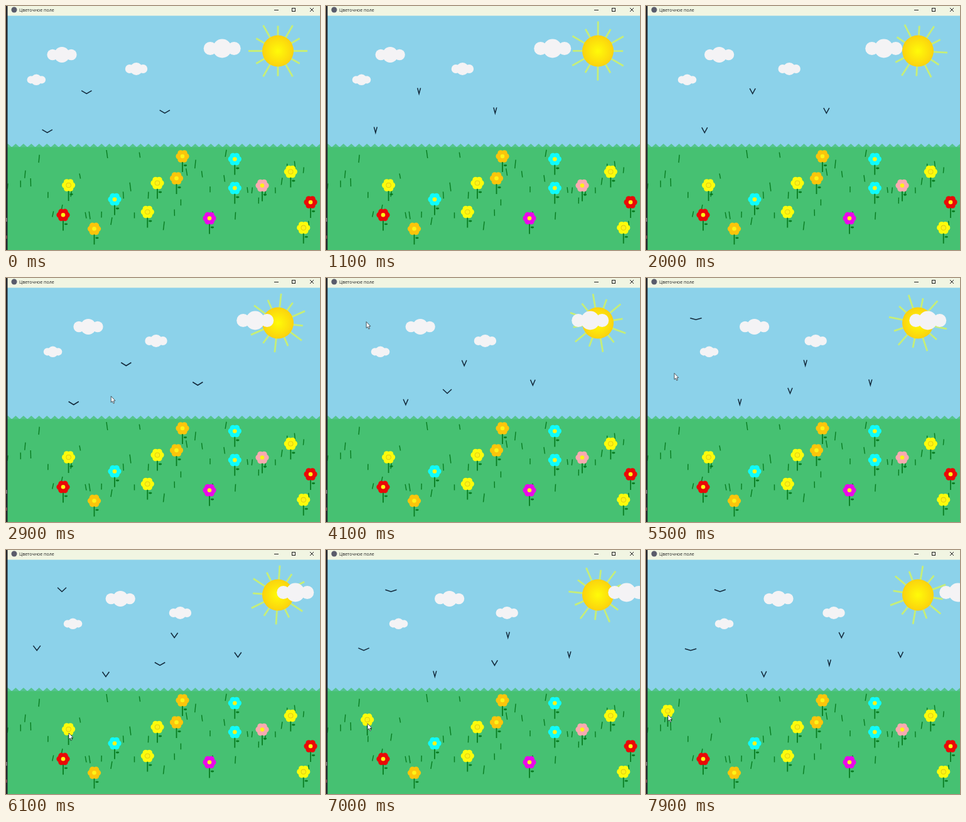
An HTML page with a canvas for the animation above (8 s loop, 500 px wide and 388 px high).

```html
<!DOCTYPE html>
<html lang="ru">
<head>
<meta charset="utf-8">
<title>Цветочное поле</title>
<style>
html, body { margin: 0; width: 100%; height: 100%; overflow: hidden; background: #8cd2ea; }
canvas { display: block; width: 500px; height: 388px; }
</style>
</head>
<body>
<canvas id="stage" width="500" height="388"></canvas>
<script>
const c = document.getElementById('stage').getContext('2d');
const LOOP = 8000, W = 500, H = 388, TAU = Math.PI * 2;
const SKY = '#8cd2ea', GRASS = '#46c172', STEM = '#087c20', CLOUD = '#f4f3f5';
const YELLOW = '#fdfb0c';

// x, y, size; drift speed follows size
const clouds = [[344.2, 67.5, 1], [89, 77.5, .8], [207.5, 100, .6], [48.3, 117.3, .5]];

// three birds fly from the beginning, each click adds one more
const birds = [128.3, 252.8, 65.7].map((x, i) =>
  ({ start: 0, x, y: 139.5 + 31 * i, speed: .024 - .004 * i, phase: 3.63 }));
const hatch = (start, x, y, speed) => birds.push({ start, x, y, speed, phase: 0 });
hatch(3360, 173.8, 183.5, .026);
hatch(4634, 65.6, 66.2, .016);
hatch(5590, 42.9, 159.7, .0122);

const beds = {
  '#fbc50c': [[281, 239], [271.5, 274], [140.5, 354.3]],
  '#0ffcfc': [[364.3, 243.5], [364.3, 289.5], [173, 307.5]],
  [YELLOW]: [[453.3, 263.5], [241, 281.5], [225.3, 327.5], [473.7, 352.7]],
  '#ea0808': [[91, 332.3], [485, 312]],
  '#fbaab0': [[408, 285.5]],
  '#ea08ea': [[324, 337.5]]
};

// pointer: time, x, y
const path = [
  [2450, -10, 230], [2880, 167, 188], [3500, 174, 184], [4000, 64, 70], [4634, 65, 67],
  [5590, 43, 160], [6050, 100, 291], [6350, 100, 291], [7600, 35, 262], [LOOP, 35, 262]
];

let seed = 11;
const rand = (lo, hi) => {
  seed = (seed * 16807) % 2147483647;
  return lo + (hi - lo) * seed / 2147483647;
};
const blades = Array.from({ length: 42 }, (_, i) => ({
  x: 8 + i * 11.6 + rand(-5, 5), y: rand(226, 352), lean: rand(-2, 2), len: rand(8, 14)
}));

function pointer(t) {
  if (t < path[0][0]) return null;
  const i = path.findIndex(p => p[0] > t), [t0, x0, y0] = path[i - 1], [t1, x1, y1] = path[i];
  const k = (t - t0) / (t1 - t0);
  return [x0 + (x1 - x0) * k, y0 + (y1 - y0) * k];
}

// the scene runs a little slower during the first moments
const sceneTime = t => t < 1100 ? t * .75 : t - 275;

function box(x, y, w, h, color) {
  c.fillStyle = color;
  c.fillRect(x, y, w, h);
}

function dot(x, y, r, color) {
  c.fillStyle = color;
  c.beginPath();
  c.arc(x, y, r, 0, TAU);
  c.fill();
}

function line(color, width, ...pts) {
  c.strokeStyle = color;
  c.lineWidth = width;
  c.beginPath();
  pts.forEach(p => c.lineTo(...p));
  c.stroke();
}

function drawSun(u) {
  const x = 433, y = 71.5;
  for (let i = 0; i < 12; i++) {
    const a = u * .00064 + i * TAU / 12, r = i % 2 ? 40 : 47;
    const cos = Math.cos(a), sin = Math.sin(a);
    line('#c6ee78', 2.8, [x + cos * 24, y + sin * 24], [x + cos * r, y + sin * r]);
  }
  const g = c.createRadialGradient(x, y, 0, x, y, 25);
  g.addColorStop(0, '#fffb08');
  g.addColorStop(1, '#fbd20e');
  dot(x, y, 25, g);
}

function drawCloud([x, y, size], u) {
  x += u * .02 * size;
  const r = 2.4 + 12.6 * size, side = r * .7, gap = 29.5 * size - side;
  dot(x - gap, y, side, CLOUD);
  dot(x + gap, y, side, CLOUD);
  dot(x, y, r, CLOUD);
}

function drawBird({ start, x, y, speed, phase }, t) {
  if (t < start) return;
  const age = start ? t - start : sceneTime(t);
  const a = (45 + 30 * Math.sin(phase + age * .0128)) * Math.PI / 180;
  const dx = Math.cos(a) * 9.5, dy = Math.sin(a) * 9.5;
  x += age * speed;
  line('#12283a', 1.5, [x - dx, y - dy], [x, y], [x + dx, y - dy]);
}

function drawGround() {
  box(0, 224, W, H - 224, GRASS);
  c.fillStyle = '#55c48d';
  c.beginPath();
  for (let x = 3; x < W + 13; x += 12.43) {
    c.moveTo(x - 6.2, 224.5);
    c.lineTo(x, 219);
    c.lineTo(x + 6.2, 224.5);
  }
  c.fill();
  for (const b of blades) line(STEM, 1.4, [b.x, b.y], [b.x + b.lean, b.y + b.len]);
}

function drawFlower(x, y, color) {
  line(STEM, 1.8, [x, y], [x, y + 25]);
  c.fillStyle = STEM;
  c.beginPath();
  c.ellipse(x + 4.5, y + 14.5, 2.7, 1.4, 0, 0, TAU);
  c.fill();
  for (let i = 0; i < 6; i++) {
    const a = i * TAU / 6;
    dot(x + Math.cos(a) * 5.8, y + Math.sin(a) * 5.8, 4.8, color);
  }
  if (color === YELLOW) dot(x, y, 4.1, '#d9c210');
  dot(x, y, 3.3, '#fdf318');
}

function drawWindow() {
  box(0, 0, W, 15.5, '#f1f5e2');
  dot(13, 6, 4.5, '#5a5c6c');
  c.fillStyle = '#222';
  c.font = '7px "Open Sans", "Noto Sans", sans-serif';
  c.fillText('Цветочное поле', 21, 8.7);
  line('#222', 1, [427, 6.5], [434, 6.5]);
  c.strokeRect(455.5, 3.5, 5, 5);
  line('#222', 1, [484, 3], [490, 9]);
  line('#222', 1, [490, 3], [484, 9]);
  box(0, 0, 2.5, H, '#24262c');
  box(0, 337, 1.5, 6, '#8d7f86');
  box(0, 365, 1.5, 5, '#8a4a52');
}

function drawPointer([x, y]) {
  c.save();
  c.translate(x, y);
  const arrow = new Path2D('M0 0V10L2.2 8 3.8 11.6 5.4 10.9 3.9 7.4 6.8 7.2Z');
  c.fillStyle = '#fff';
  c.fill(arrow);
  c.strokeStyle = '#27313a';
  c.lineWidth = .8;
  c.stroke(arrow);
  c.restore();
}

function draw(t) {
  const u = sceneTime(t), tip = pointer(t);
  box(0, 0, W, H, SKY);
  drawSun(u);
  clouds.forEach(cloud => drawCloud(cloud, u));
  drawGround();
  // one flower is picked up and follows the pointer
  const [hx, hy] = t > 6350 ? tip : [100, 291];
  drawFlower(hx - .4, hy - 6, YELLOW);
  for (const color in beds) beds[color].forEach(([x, y]) => drawFlower(x, y, color));
  birds.forEach(b => drawBird(b, t));
  drawWindow();
  if (tip) drawPointer(tip);
}

const begin = performance.now();
function tick() {
  draw((performance.now() - begin) % LOOP);
  requestAnimationFrame(tick);
}
tick();
</script>
</body>
</html>
```
